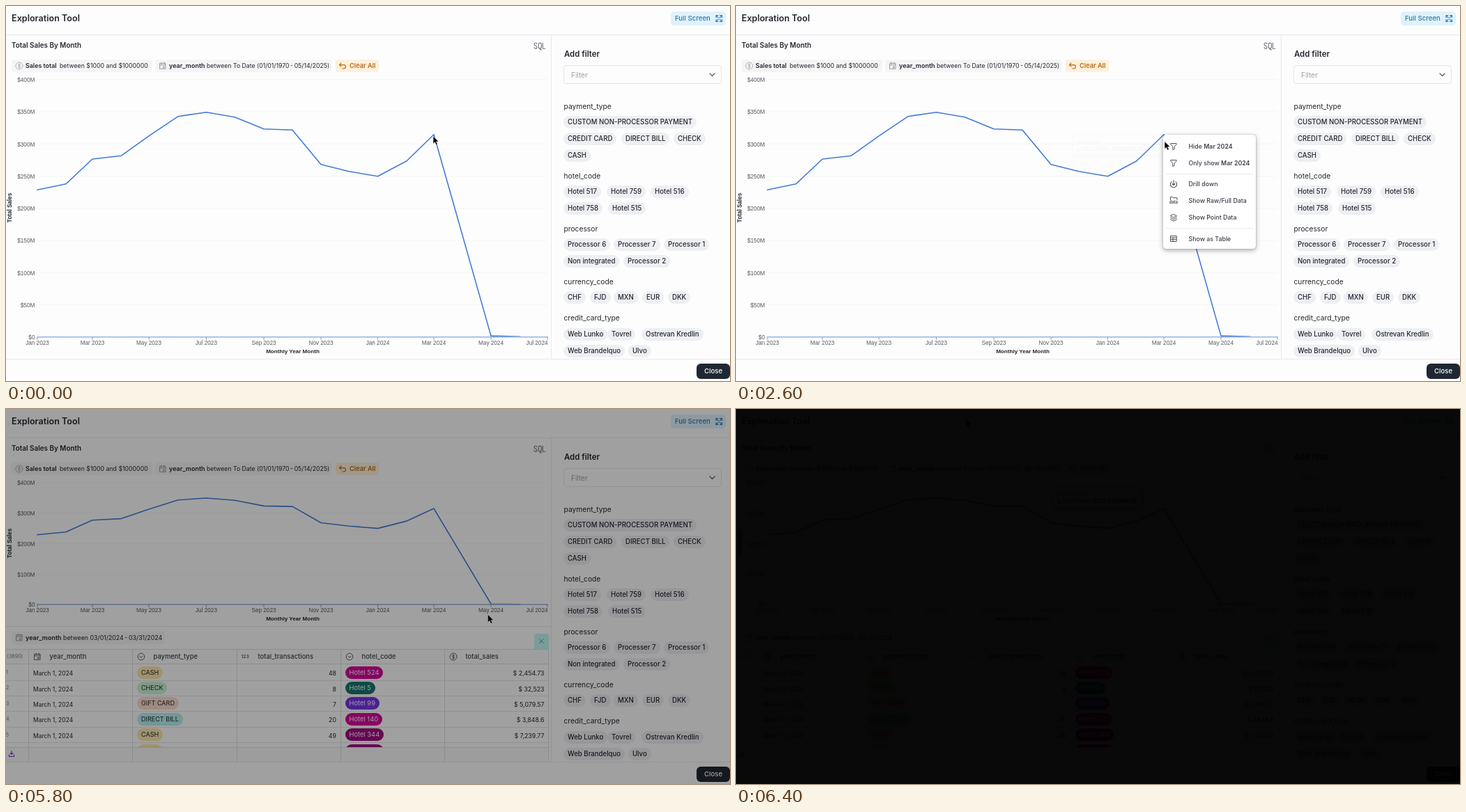
Write an HTML page that moves like this. It is 1039 px wide and 539 px high and loops after 6800 ms.

```html
<!DOCTYPE html>
<html lang="en">
<head>
<meta charset="utf-8">
<title>Exploration Tool</title>
<style>
html, body { margin: 0; width: 100%; height: 100%; overflow: hidden; background: #fdfdfd; }
#stage { position: absolute; left: 0; top: 0; width: 1039px; height: 539px; overflow: hidden;
  background: #fdfdfd; color: #23272f; font-family: Inter, sans-serif; }
#stage div { position: absolute; box-sizing: border-box; }
#stage svg { position: absolute; left: 0; top: 0; overflow: visible; fill: none; }
.t { white-space: pre; line-height: 20px; height: 20px; }
.t b { font-weight: 600; }
.chart .t, .tip .t { font-family: "Liberation Sans", Arial, sans-serif; }
.tip .t b { font-weight: 700; }
.c { transform: translateX(-50%); }
.r { transform: translateX(-100%); }
.chip { white-space: pre; border-radius: 9px; }
.tip { width: 128px; height: 31px; background: #fff; border: 1px solid #a3a7ad; border-radius: 3px;
  box-shadow: 1px 2px 6px rgba(0,0,0,.28); }
.menu { left: 613px; top: 185px; width: 133px; height: 164px; background: #fff; border-radius: 4px;
  box-shadow: 0 2px 7px rgba(0,0,0,.35), 0 0 1px rgba(0,0,0,.6); transform-origin: 0 0; }
</style>
</head>
<body>
<div id="stage"></div>
<script>
const stage = document.getElementById('stage');

function box(parent, x, y, w, h, css = '', cls = '') {
  const d = document.createElement('div');
  d.className = cls;
  d.style.cssText = `left:${x}px;top:${y}px;` + (w ? `width:${w}px;height:${h}px;` : '') + css;
  parent.append(d);
  return d;
}
// y is the middle of the capitals
function text(parent, x, y, str, size, css = '', cls = '') {
  const d = box(parent, x, y - 10, 0, 0, `font-size:${size}px;${css}`, 't ' + cls);
  d.innerHTML = str;
  return d;
}
function chip(parent, x, y, str, size, h, pad, css) {
  const d = box(parent, x - pad, y - h / 2, 0, 0,
    `height:${h}px;line-height:${h}px;padding:0 ${pad}px;font-size:${size}px;${css}`, 'chip');
  d.textContent = str;
  return d;
}
function svg(parent, body) {
  parent.insertAdjacentHTML('beforeend', `<svg width="1039" height="539">${body}</svg>`);
  return parent.lastElementChild;
}
const path = (d, color, w = 1, extra = '') =>
  `<path d="${d}" stroke="${color}" stroke-width="${w}" stroke-linecap="round" stroke-linejoin="round" ${extra}/>`;
const ring = (x, y, r, color) => `<circle cx="${x}" cy="${y}" r="${r}" stroke="${color}" stroke-width=".9"/>`;

const icon = {
  dollar: (x, y, c) => ring(x, y, 5, c) +
    path(`M${x + 1.7} ${y - 1.5}q-.6-.8-1.7-.8c-2.4 0-2.3 2.2 0 2.3c2.4.1 2.4 2.4 0 2.4q-1.2 0-1.8-.9M${x} ${y - 3.2}v6.4`, c, .8),
  calendar: (x, y, c) =>
    path(`M${x - 4} ${y - 3.6}h8v8h-8zM${x - 4} ${y - 1.2}h8M${x - 2} ${y - 5}v2M${x + 2} ${y - 5}v2M${x + .8} ${y + 1.3}h1.4v1.4h-1.4z`, c, .9),
  check: (x, y, c) => ring(x, y, 4.8, c) + path(`M${x - 2} ${y - .6}l2 2l2-2`, c),
  funnel: (x, y, c) => path(`M${x - 4} ${y - 4}h8v1.6l-2.8 3v3.4l-2.4 1v-4.4l-2.8-3z`, c),
};

/* page frame */
const rule = (p, x, y, w, h, c = '#e9e9ec') => box(p, x, y, w, h, `background:${c}`);
const tag = (p, x, y, w, c = '#f5f5f6') => box(p, x, y, w, 18, `background:${c};border-radius:4px`);
rule(stage, 0, 41, 1039, 1);
rule(stage, 782, 41, 1, 466);
rule(stage, 0, 507, 1039, 1);
text(stage, 8, 18, 'Exploration Tool', 12.6, 'font-weight:600');
text(stage, 8, 56, 'Total Sales By Month', 9.9, 'font-weight:600');
box(stage, 954, 8, 79, 20, 'background:#dff2fb;border-radius:5px');
text(stage, 960, 18, 'Full Screen', 9.6, 'font-weight:500;color:#2f79ad');

const grey = '#8b9098';
tag(stage, 8, 77, 202);
tag(stage, 214, 77, 253);
tag(stage, 473, 77, 62, '#fdf0dc');
text(stage, 28, 86, '<b>Sales total</b>', 8.9);
text(stage, 77, 86, 'between $1000 and $1000000', 8.75);
text(stage, 234, 86, '<b>year_month</b>', 9);
text(stage, 288, 86, 'between To Date (01/01/1970&thinsp;-&thinsp;05/14/2025)', 8.7);
text(stage, 493, 86, 'Clear All', 9.2, 'font-weight:600;color:#bd6a14');
svg(stage,
  icon.dollar(19, 86, '#a5a9af') + icon.calendar(225, 86, grey) +
  path('M481 82l-2.6 2.6l2.6 2.6M478.5 84.6h6.2a2.6 2.6 0 0 1 0 5.4h-2', '#bd6a14', 1.1) +
  path('M762 54.5q-.5-1.5-2-1.5q-2 0-2 2c0 2.5 4 1.500 4 4.2q0 2-2 2q-1.7 0-2-1.6M764.3 55.5q0-2.5 2-2.5t2 2.5v3.2q0 2.5-2 2.5t-2-2.5zM766.5 60.5v2.3h2M770.3 53v8.2h3.5', '#6d737c', 1.1) +
  path('M1019 16.5v-3h3M1019 13.5l3.3 3.3M1024.5 13.5h3v3M1027.5 13.5l-3.3 3.3M1019 19.5v3h3M1019 22.5l3.3-3.3M1024.5 22.5h3v-3M1027.5 22.5l-3.3-3.3', '#2f79ad', 1.1));

/* sidebar */
text(stage, 801, 69, 'Add filter', 11.4, 'font-weight:600');
box(stage, 800, 85, 227, 27, 'border:1px solid #e4e5e8;border-radius:4px');
text(stage, 811, 98.5, 'Filter', 10, 'color:#9a9ea6');
svg(stage, path('M1010 97l3.5 3.5l3.5-3.5', '#555a62', 1.2));

const groups = [
  ['payment_type', 143.5, [167, 806, 'CUSTOM NON-PROCESSOR PAYMENT'],
    [191, 806, 'CREDIT CARD', 889, 'DIRECT BILL', 964, 'CHECK'], [214.5, 806, 'CASH']],
  ['hotel_code', 243.5, [267, 806, 'Hotel 517', 868, 'Hotel 759', 931, 'Hotel 516'],
    [291, 806, 'Hotel 758', 870, 'Hotel 515']],
  ['processor', 320, [343, 806, 'Processor 6', 878, 'Processer 7', 950, 'Processor 1'],
    [367, 806, 'Non integrated', 892, 'Processor 2']],
  ['currency_code', 396, [419, 806, 'CHF', 844, 'FJD', 878, 'MXN', 919, 'EUR', 956, 'DKK']],
  ['credit_card_type', 448, [471.5, 806, 'Web Lunko', 869, 'Tovrel', 918, 'Ostrevan Kredlin'],
    [495.5, 806, 'Web Brandelquo', 899, 'Ulvo']],
];
for (const [title, y, ...rows] of groups) {
  text(stage, 800.5, y, title, 10.25);
  for (const [cy, ...cells] of rows)
    for (let i = 0; i < cells.length; i += 2)
      chip(stage, cells[i], cy, cells[i + 1], 9.65, 18, 6, 'background:#eeeff2;font-weight:500');
}
box(stage, 991, 514, 48, 22, 'background:#1f2832;border-radius:6px');
text(stage, 1002, 525, 'Close', 9.6, 'font-weight:500;color:#fff');

/* chart, drawn once tall and once short */
const months = [45, 86, 124, 165.5, 205, 247, 287.5, 328.5, 370, 411, 452, 492, 533.5, 575, 614, 696, 738];
const sales = [228.6, 237.8, 276.5, 281.6, 312.4, 342.7, 349.2, 341.6, 323.2, 321.6, 268.1, 257.3, 249.7, 273.5, 314.6, 1.8, .7];
const labels = ['Jan 2023', 'Mar 2023', 'May 2023', 'Jul 2023', 'Sep 2023', 'Nov 2023', 'Jan 2024', 'Mar 2024', 'May 2024'];

function chart(base, step) {
  const g = box(stage, 0, 0, 0, 0, '', 'chart');
  const py = v => base - v * (base - 105.7) / 400;
  let marks = '';
  for (let v = 0; v <= 400; v += step) {
    if (v) marks += path(`M45 ${py(v)}H777`, '#f6f6f7');
    text(g, 41.5, py(v) + .4, v ? `$${v}M` : '$0', 8.3, 'color:#555a62', 'r');
  }
  labels.forEach((s, i) => {
    const x = months[i * 2 - (i > 7 ? 1 : 0)];
    marks += path(`M${x} ${base}v3.5`, '#8f96a3');
    text(g, x, base + 9, s, 8.2, 'color:#555a62', 'c');
  });
  marks += path(`M777 ${base}v3.5`, '#8f96a3');
  text(g, 777.5, base + 9, 'Jul 2024', 8.2, 'color:#555a62', 'r');
  text(g, 411.5, base + 21.3, 'Monthly Year Month', 8.1, 'font-weight:700', 'c');
  text(g, 6, (base + 106) / 2 - 1, 'Total Sales', 8.15,
    'font-weight:700;transform:translateX(-50%) rotate(-90deg)');
  const d = 'M' + months.map((x, i) => `${x} ${py(sales[i]).toFixed(1)}`).join('L');
  const axis = path(`M45 ${base}H777.5`, '#94b4e4', 1.4);
  const line = svg(g, marks + path(d, '#437bd8', 1.6, 'class="line"') + axis).querySelector('.line');
  return { g, line };
}
const tall = chart(475.8, 50), short = chart(281, 100);

/* data panel */
const panel = box(stage, 0, 312, 782, 195, 'background:#fdfdfd;border-top:1px solid #e4e4e7');
const sheet = box(stage, 0, 0, 782, 507);
tag(panel, 8, 6.5, 220);
text(panel, 28, 15.5, '<b>year_month</b>', 9);
text(panel, 82, 15.5, 'between 03/01/2024&thinsp;-&thinsp;03/31/2024', 8.8);
box(panel, 758, 10, 21, 22, 'background:#c3f7f2;border-radius:4px 4px 0 0');
svg(panel, icon.calendar(19, 15.5, grey) + path('M765.3 17.7l6 6M771.3 17.7l-6 6', '#37979f', .9));

box(sheet, 0, 345, 779, 22, 'background:#f9f9fa;border:solid #dcdde0;border-width:1px 0');
text(sheet, 1, 356, '(3690)', 7.3, 'color:#777c84');
const cols = [32, 181, 331, 480, 629];
['year_month', 'payment_type', 'total_transactions', 'hotel_code', 'total_sales'].forEach((s, i) =>
  text(sheet, cols[i] + 30.5, 356, s, 9.4, 'font-weight:500;color:#3b4049'));
text(sheet, 337.5, 356, '123', 6.6, 'font-weight:600;color:#555a62');

const yellow = '#fbe7ab', pink = '#d4069b', plum = '#a30a82';
const rows = [
  ['CASH', yellow, 48, 'Hotel 524', pink, '2,454.73'],
  ['CHECK', '#caf2d4', 8, 'Hotel 5', '#17756d', '32,523'],
  ['GIFT CARD', '#fbdccb', 7, 'Hotel 99', '#7434e8', '5,079.57'],
  ['DIRECT BILL', '#b5efec', 20, 'Hotel 140', pink, '3,848.6'],
  ['CASH', yellow, 49, 'Hotel 344', plum, '7,239.77'],
  ['CASH', yellow, 12, 'Hotel 344', plum, '4,120.35'],
];
const body = box(sheet, 0, 367, 779, 119, 'overflow:hidden');
rows.forEach(([pay, tint, count, hotel, fill, total], i) => {
  const y = 11.5 + i * 22.4;
  rule(body, 0, Math.round(y + 11), 779, 1, '#e4e5e8');
  text(body, 0, y + .5, i + 1, 7, 'color:#777c84');
  text(body, 39, y + 1.7, 'March 1, 2024', 8.5);
  chip(body, 194, y, pay, 9.05, 18, 6, `background:${tint}`);
  text(body, 474, y + 1.7, count, 8.8, '', 'r');
  chip(body, 492.5, y, hotel, 9.35, 18, 6, `background:${fill};color:#fff`);
  text(body, 772.5, y + 1.7, '$ ' + total, 8.8, '', 'r');
});
box(sheet, 0, 486, 779, 21, 'background:#f8f8f9;border-top:1px solid #dcdde0');
for (const x of [...cols, 778]) rule(sheet, x, 345, 1, 162, '#dcdde0');
const ink = '#4d525b';
svg(sheet, icon.calendar(45, 356, ink) + icon.check(194, 356, ink) + icon.check(493, 356, ink) +
  icon.dollar(642, 356, ink) + path('M8 491.5v5M6 494.7l2 2l2-2M4.5 497v2.5h7v-2.5', '#7a2fd0', 1.1));

/* tooltip */
const tip = box(stage, 0, 0, 0, 0, '', 'tip');
const tipDate = text(tip, 5, 10, '', 6.8, 'color:#555a62');
box(tip, 6, 18.5, 4, 4, 'background:#437bd8;border-radius:50%');
const tipText = text(tip, 12, 20, '', 8.25, 'color:#3b4049');

/* context menu */
const menu = box(stage, 613, 185, 0, 0, '', 'menu');
[['Hide <b>Mar 2024</b>', 16.5], ['Only show <b>Mar 2024</b>', 40.5], ['Drill down', 71],
 ['Show Raw/Full Data', 95], ['Show Point Data', 119], ['Show as Table', 149.5]].forEach(([s, y]) =>
  text(menu, 36.5, y, s, 8.8, 'font-weight:500;color:#3b4049'));
rule(menu, 4, 56, 125, 1);
rule(menu, 4, 134, 125, 1);
svg(menu, icon.funnel(15, 16.5, ink) + icon.funnel(15, 40.5, ink) +
  path('M12 67.6a4.6 4.6 0 1 0 6 0M15 65.5v7M13 70.5l2 2l2-2', ink, 1.1) +
  path('M10.5 93.5v-4h3l1 1.3h5.5v2.7', ink) +
  path('M15 114.5l4.5 2.3l-4.5 2.3l-4.5-2.3zM10.5 119.3l4.5 2.3l4.5-2.3M10.5 121.8l4.5 2.3l4.5-2.3', ink) +
  path('M10.8 145.5h8.4v8h-8.4zM10.8 148h8.4M10.8 150.7h8.4M14 148v5.5', ink));
text(menu, 15, 96.6, 'data', 5.6, 'font-weight:700;color:#4d525b', 'c');

const cursor = svg(stage, '<path d="M0 0v11l2.5-2.3l1.8 4l2-.9l-1.8-3.9h3.5z" fill="#000" stroke="#fff" stroke-width=".6"/>');
const shade = box(stage, 0, 0, 1039, 539, 'background:#000');

/* timeline: [ms, values...], linear between entries */
const LOOP = 6800;
const tracks = {
  cursor: [[0, 613, 187], [1200, 613, 185], [2000, 613, 185], [2600, 615, 194.5], [3000, 640, 245], [3400, 662, 275],
    [4200, 660, 278], [4800, 654, 299.5], [5600, 654, 299.5], [5800, 691.5, 295.5], [6000, 534.5, 9], [6200, 420, 12], [6400, 330, 14.5]],
  tip: [[0, 482, 185], [5800, 482, 185], [6000, 477, 131], [6200, 463, 118], [6400, 455, 112]],
  shade: [[0, 0], [5600, 0], [5800, .37], [6000, .66], [6200, .84], [6400, .963]],
  tipAlpha: [[0, 0], [200, 1], [2400, 1], [2600, .03], [2800, 0], [5800, 0], [6000, 1]],
  menu: [[0, 0], [1000, 0], [1200, .04], [1800, .04], [2000, 1], [4000, 1], [4200, 0]],
};
function at(track, t) {
  const i = track.findIndex(k => k[0] > t);
  if (i < 0) return track[track.length - 1].slice(1);
  const a = track[i - 1], b = track[i], f = (t - a[0]) / (b[0] - a[0]);
  return a.slice(1).map((v, n) => v + (b[n + 1] - v) * f);
}
const rests = [[1200, 2000], [2200, 2600], [4800, 5800], [6400, LOOP]];
function snap(t) {
  const rest = rests.find(([a, b]) => t >= a && t < b);
  return rest ? rest[0] : Math.floor(t / 200) * 200;
}
const show = (node, on) => node.style.display = on ? '' : 'none';

let last = -1;
function draw() {
  const t = snap(performance.now() % LOOP);
  if (t !== last) {
    last = t;
    const split = t >= 4200, late = t >= 5800;
    show(tall.g, !split);
    show(short.g, split);
    show(panel, split);
    show(sheet, t >= 4400);
    const hover = (t >= 200 && t < 2600) || t >= 6000;
    for (const c of [tall, short]) c.line.setAttribute('stroke-width', hover ? (split ? 1.9 : 2.3) : 1.6);

    const [x, y] = at(tracks.cursor, t);
    cursor.style.transform = `translate(${x}px,${y}px)`;
    const [tx, ty] = at(tracks.tip, t);
    tip.style.transform = `translate(${tx}px,${ty}px)`;
    tip.style.opacity = at(tracks.tipAlpha, t)[0];
    tipDate.textContent = late ? 'February 2024' : 'March 2024';
    tipText.innerHTML = `Total Sales: <b>${late ? '$272,343,599.03' : '$314,083,010.06'}</b>`;

    const [grow] = at(tracks.menu, t);
    menu.style.opacity = grow;
    menu.style.transform = grow === 1 ? 'none' : `scale(${.75 + .25 * grow},${.5625 + .4375 * grow})`;
    shade.style.opacity = at(tracks.shade, t)[0];
  }
  requestAnimationFrame(draw);
}
draw();
</script>
</body>
</html>
```
